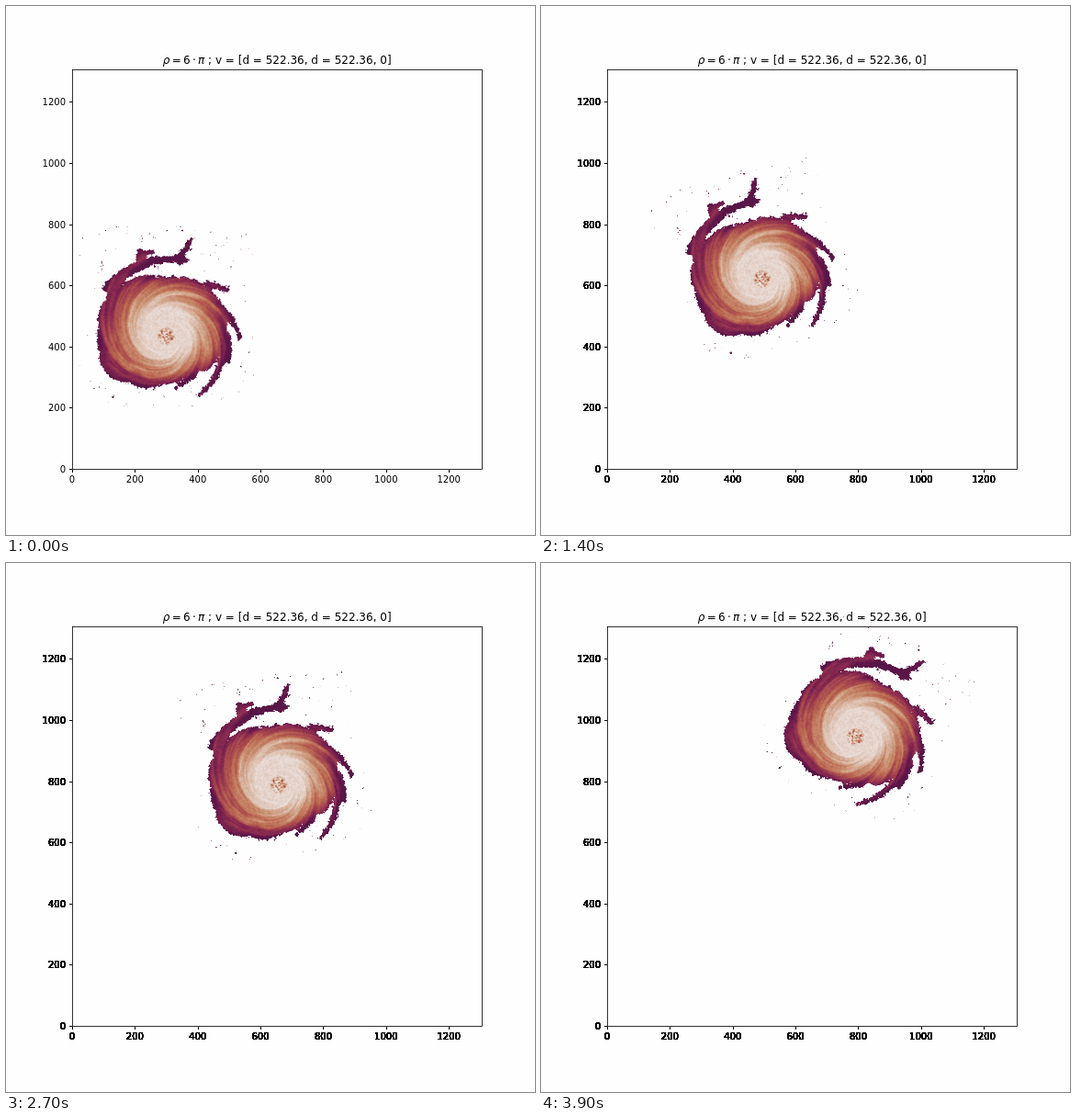
Recreate the animation shown at these times as an HTML page with a canvas. Size 576 px wide and 576 px high, loop 4000 ms.

```html
<!DOCTYPE html>
<html lang="en">
<head>
<meta charset="utf-8">
<title>Rotating and translating storm</title>
<style>
html, body { margin: 0; width: 100%; height: 100%; overflow: hidden; background: #fefefe; }
canvas { display: block; }
</style>
</head>
<body>
<canvas id="stage" width="576" height="576"></canvas>
<script>
const ctx = document.getElementById('stage').getContext('2d');
const STEPS = 40, STEP_MS = 100, TURN = 6 * Math.PI, SHIFT = 522.36;
const LIMIT = SHIFT * 2.5, SX = 446.4 / LIMIT, SY = 434.88 / LIMIT;
const PIVOT = { x: 172.3, y: 346.7 }, EYE = { x: 174, y: 359 };
const BOX = { x: 80, y: 240, w: 190, h: 196 }, RES = 2;
const FONT = '"DejaVu Sans", sans-serif';

// Body radius every 30 degrees, counterclockwise from the right.
const RADII = [67, 70, 69, 64, 72, 77, 75, 77, 63, 53, 50, 60];
// Arms as spiral strokes: start angle and radius, end angle and radius, width.
const ARMS = [
  [140, 80, 76, 84, 13], [80, 84, 75, 108, 8], [111, 80, 107, 97, 9], [108, 92, 99, 93, 8],
  [52, 71, 36, 84, 8], [25, 68, -2, 81, 8], [0, 66, -22, 73, 7],
  [-8, 64, -62, 74, 8], [-45, 50, -81, 58, 6]
];
// Dark purple through red and tan to near white.
const PALETTE = ['381338', '4e1244', '69194c', '8a2b4f', 'a4444e', 'ba6750', 'c98f71', 'dabaa7', 'e9dcd8']
  .map(hex => [0, 2, 4].map(i => parseInt(hex.slice(i, i + 2), 16)));

const clamp = v => Math.min(1, Math.max(0, v));

function polar(degrees, r) {
  const a = degrees * Math.PI / 180;
  return [EYE.x + r * Math.cos(a), EYE.y - r * Math.sin(a)];
}

function bodyRadius(degrees) {
  const i = Math.floor(degrees / 30), u = degrees / 30 - i, ease = u * u * (3 - 2 * u);
  return RADII[i % 12] * (1 - ease) + RADII[(i + 1) % 12] * ease;
}

function layer() {
  const c = document.createElement('canvas');
  c.width = BOX.w * RES;
  c.height = BOX.h * RES;
  return c;
}

function silhouette() {
  const c = layer(), g = c.getContext('2d');
  g.scale(RES, RES);
  g.translate(-BOX.x, -BOX.y);
  g.beginPath();
  for (let a = 0; a < 360; a += 3) g.lineTo(...polar(a, bodyRadius(a)));
  g.fill();
  g.lineCap = 'round';
  for (const [a0, r0, a1, r1, width] of ARMS) {
    for (let u = 0; u < 1; u += 0.05) {
      g.lineWidth = width * (1 - 0.5 * u);
      g.beginPath();
      for (const p of [u, u + 0.05]) g.lineTo(...polar(a0 + (a1 - a0) * p, r0 + (r1 - r0) * p));
      g.stroke();
    }
  }
  return c;
}

// Alpha of the silhouette, softened by a blur given in stage pixels.
function softMask(shape, blur) {
  const g = layer().getContext('2d');
  g.filter = `blur(${blur * RES}px)`;
  g.drawImage(shape, 0, 0);
  const { data } = g.getImageData(0, 0, shape.width, shape.height);
  return i => data[i * 4 + 3] / 255;
}

// Smooth value noise in -0.5..0.5 on a seeded lattice that repeats every 64 cells.
function makeNoise(seed) {
  const random = () => (seed = (seed * 1664525 + 1013904223) >>> 0) / 4294967296;
  const grid = Array.from({ length: 4096 }, random);
  const at = (x, y) => grid[(x & 63) + (y & 63) * 64];
  return (x, y) => {
    const i = Math.floor(x), j = Math.floor(y), u = x - i, v = y - j;
    const top = at(i, j) * (1 - u) + at(i + 1, j) * u;
    const low = at(i, j + 1) * (1 - u) + at(i + 1, j + 1) * u;
    return top * (1 - v) + low * v - 0.5;
  };
}

function shade(v) {
  const p = clamp(v) * (PALETTE.length - 1), i = Math.min(Math.floor(p), PALETTE.length - 2);
  return PALETTE[i].map((c, k) => c + (PALETTE[i + 1][k] - c) * (p - i));
}

function makeStorm() {
  const c = layer(), g = c.getContext('2d'), image = g.createImageData(c.width, c.height);
  const shape = silhouette(), edge = softMask(shape, 1.5), depth = softMask(shape, 8);
  const noise = makeNoise(7);
  for (let i = 0; i < c.width * c.height; i++) {
    const x = BOX.x + (i % c.width) / RES, y = BOX.y + Math.floor(i / c.width) / RES;
    const ragged = 0.55 * noise(x / 4, y / 4) + 0.75 * noise(x / 1.3, y / 1.3);
    if (edge(i) + ragged < 0.45) continue;
    const dx = x - EYE.x, dy = EYE.y - y, r = Math.hypot(dx, dy) + 0.01;
    const swirl = Math.atan2(dy, dx) + Math.log(r) / 0.3;
    const warp = 3 * noise(x / 12, y / 12);
    const band = (arms, phase) => Math.sin(arms * swirl + phase + warp);
    const bands = 0.6 * band(3, 1) + 0.7 * band(7, 2) + 0.4 * band(13, 4);
    const streak = noise(swirl * 32 / Math.PI, Math.log(r) * 6);
    const core = Math.hypot(dx, y - 354);
    const inside = clamp((depth(i) - 0.42) / 0.55), outer = clamp((core - 22) / 28);
    let v = 0.97 - 0.52 * clamp((core - 26) / 38);
    v *= 0.36 + 0.64 * inside;
    v += bands * (0.01 + 0.065 * outer) + streak * (0.05 + 0.15 * outer);
    v += 0.08 * noise(x / 1.5, y / 1.5);
    if (r < 10) v += (0.7 * noise(x / 1.5, y / 1.5) - 0.16) * clamp((10 - r) / 3);
    image.data.set([...shade(Math.max(v, 0.17)), 255], i * 4);
  }
  g.putImageData(image, 0, 0);
  return c;
}

function label(text, x, y, align, size = 10, style = '') {
  ctx.font = `${style} ${size}px ${FONT}`;
  ctx.textAlign = align;
  ctx.fillText(text, x, y);
}

function drawAxes(passes) {
  ctx.fillStyle = ctx.strokeStyle = '#000';
  ctx.lineWidth = 0.8;
  ctx.strokeRect(72.5, 69.5, 446, 435);
  for (let v = 0; v <= 1200; v += 200) {
    const x = 72 + v * SX, y = 504 - v * SY;
    ctx.fillRect(Math.round(x), 505, 1, 3);
    ctx.fillRect(69, Math.round(y), 3, 1);
    // Labels are stamped again on every step, so their edges grow heavier.
    for (let n = 0; n < passes; n++) {
      label(v, x, 519, 'center');
      label(v, 65, Math.round(y) + 4, 'right');
    }
  }
  label('ρ', 170.8, 63, 'left', 12, 'italic');
  label('=', 180.7, 63, 'left', 12);
  label('6', 193.1, 63, 'left', 12);
  label('·', 203, 63, 'left', 12);
  label('π', 209.1, 63, 'left', 12, 'italic');
  label('; v = [d = 522.36, d = 522.36, 0]', 220.1, 63, 'left', 12);
}

const storm = makeStorm();

function draw(step) {
  const t = step / STEPS;
  ctx.fillStyle = '#fefefe';
  ctx.fillRect(0, 0, 576, 576);
  ctx.save();
  ctx.translate(PIVOT.x + SHIFT * SX * t, PIVOT.y - SHIFT * SY * t);
  ctx.scale(SX, SY);
  ctx.rotate(-TURN * t);
  ctx.scale(1 / SX, 1 / SY);
  ctx.drawImage(storm, BOX.x - PIVOT.x, BOX.y - PIVOT.y, BOX.w, BOX.h);
  ctx.restore();
  drawAxes(step + 1);
}

let shown = -1;
const start = performance.now();
function tick() {
  const step = Math.floor((performance.now() - start) / STEP_MS) % STEPS;
  if (step !== shown) draw(shown = step);
  requestAnimationFrame(tick);
}
tick();
</script>
</body>
</html>
```
